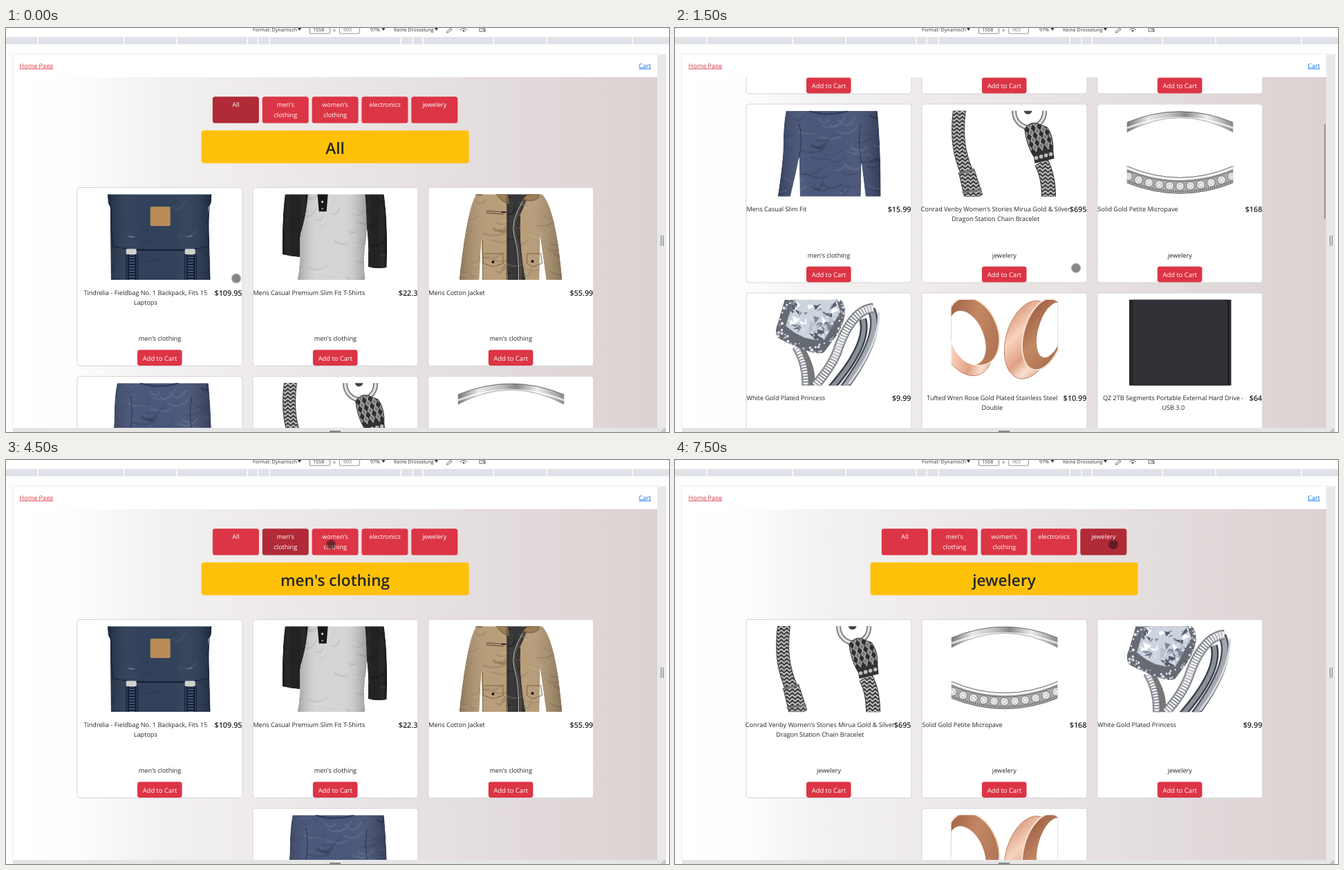
An HTML page that plays this animation: 959 by 584 pixels, repeating every 8 s.

```html
<!DOCTYPE html>
<html lang="en">
<head>
<meta charset="utf-8">
<title>Shop</title>
<style>
html,body{margin:0;width:100%;height:100%;overflow:hidden;background:#fff}
svg{display:block}
#stage{width:959px;height:584px}
text{font:9.1px "Open Sans","Noto Sans",sans-serif;fill:#212529;text-rendering:geometricPrecision}
.mid{text-anchor:middle}
.price{font-size:10.8px;font-weight:600;text-anchor:end}
.head{font-size:22.6px;font-weight:600;text-anchor:middle}
.light{fill:#fff;text-anchor:middle}
.bar{font-size:7.1px;fill:#333}
.link{text-decoration:underline}
.card{fill:#fff;stroke:#d6d3d3}
.red{fill:#dc3545}
.on{fill:#b02a37}
.line{fill:none}
</style>
</head>
<body>
<svg id="stage" viewBox="0 0 959 584">
<defs>
  <linearGradient id="bg">
    <stop offset="0" stop-color="#fff"/><stop offset=".1" stop-color="#fdfdfd"/>
    <stop offset=".22" stop-color="#f3f1f1"/><stop offset=".5" stop-color="#ebe6e6"/>
    <stop offset=".85" stop-color="#e0d8d8"/><stop offset="1" stop-color="#dcd2d2"/>
  </linearGradient>
  <linearGradient id="round">
    <stop offset="0" stop-opacity=".3"/><stop offset=".3" stop-color="#fff" stop-opacity=".06"/>
    <stop offset=".65" stop-color="#fff" stop-opacity=".06"/><stop offset="1" stop-opacity=".32"/>
  </linearGradient>
  <linearGradient id="metal">
    <stop offset="0" stop-color="#777"/><stop offset=".2" stop-color="#e9e9e9"/><stop offset=".42" stop-color="#bbb"/>
    <stop offset=".55" stop-color="#888"/><stop offset=".75" stop-color="#eee"/><stop offset="1" stop-color="#888"/>
  </linearGradient>
  <linearGradient id="rose" x2="1" y2="1">
    <stop offset="0" stop-color="#c98263"/><stop offset=".35" stop-color="#f8d3bd"/>
    <stop offset=".6" stop-color="#e0a185"/><stop offset=".75" stop-color="#fbe0d0"/><stop offset="1" stop-color="#c98566"/>
  </linearGradient>
  <linearGradient id="roseIn" x2="1" y2="1">
    <stop offset="0" stop-color="#95573c"/><stop offset=".5" stop-color="#c28763"/><stop offset="1" stop-color="#a86c4e"/>
  </linearGradient>
  <pattern id="weave" width="8" height="5.5" patternUnits="userSpaceOnUse">
    <path d="M0 0h8v6H0z" fill="#333"/>
    <path d="M0 0L4 4L8 0M0 5.5L4 9.5L8 5.5M0 -5.5L4 -1.5L8 -5.5" fill="none" stroke="#cfcfcf" stroke-width="1.9"/>
  </pattern>
  <pattern id="scale" width="9" height="11" patternUnits="userSpaceOnUse" patternTransform="rotate(-15)">
    <path d="M0 0h9v11H0z" fill="#2e2e2e"/>
    <path d="M4.5 0L8 5.5L4.5 11L1 5.5z" fill="#777" stroke="#ddd"/>
  </pattern>
  <pattern id="cloth" width="2" height="2" patternUnits="userSpaceOnUse">
    <path d="M0 0h1v1H0z" fill="#fff" fill-opacity=".07"/><path d="M1 1h1v1H1z" fill-opacity=".12"/>
  </pattern>
  <pattern id="pin" width="3.2" height="4" patternUnits="userSpaceOnUse">
    <path d="M0 0h4v4H0z" fill="#dadbe4"/><path d="M0 0h.9v4H0z" fill="#8186a3"/>
  </pattern>
  <clipPath id="view"><path d="M10 71h932v507H10z"/></clipPath>
</defs>
<g id="chrome"></g>
<g clip-path="url(#view)">
  <path d="M10 71h932v507H10z" fill="url(#bg)"/>
  <g id="page"></g>
</g>
<path id="thumb" d="M940 40v137" stroke="#979595" stroke-width="2"/>
<g id="touch">
  <circle r="7.2" fill="#000" fill-opacity=".3"/>
  <circle r="6" fill="#222" fill-opacity=".3"/>
</g>
<path id="arrow" d="M0 0v11l2.6-2.3l1.8 4l2-.9l-1.8-3.8h3.5z" fill="#fff" stroke="#222" stroke-width=".8"/>
</svg>
<script>
const $ = id => document.getElementById(id);
const range = (n, f) => Array.from({length: n}, (_, i) => f(i)).join('');
const fill = (d, color, extra = '') => `<path d="${d}" fill="${color}" ${extra}/>`;
const line = (d, color, w = 1, extra = '') => `<path class="line" d="${d}" stroke="${color}" stroke-width="${w}" ${extra}/>`;
const rect = (x, y, w, h, color, r = 0, extra = '') =>
  `<rect x="${x}" y="${y}" width="${w}" height="${h}" rx="${r}" fill="${color}" ${extra}/>`;
const dot = (x, y, r, color, extra = '') => `<circle cx="${x}" cy="${y}" r="${r}" fill="${color}" ${extra}/>`;
const oval = (x, y, rx, ry, turn, color, extra = '') =>
  `<ellipse rx="${rx}" ry="${ry}" transform="translate(${x} ${y}) rotate(${turn})" fill="${color}" ${extra}/>`;
const text = (x, y, str, cls = '', extra = '') => `<text x="${x}" y="${y}" class="${cls}" ${extra}>${str}</text>`;

let seed = 7, clips = 0;
const rnd = () => (seed = seed * 16807 % 2147483647) / 2147483647;
const clipped = (d, body) => {
  const id = 'clip' + clips++;
  return `<clipPath id="${id}"><path d="${d}"/></clipPath><g clip-path="url(#${id})">${body}</g>`;
};

// A garment silhouette with soft random creases kept inside it.
const fabric = (d, color, n = 40, depth = .16) => clipped(d, fill(d, color) + fill(d, 'url(#round)', 'opacity=".8"') +
  range(n, i => {
    const x = rnd() * 150, y = rnd() * 124, l = 10 + rnd() * 22;
    return line(`M${x} ${y}q${l / 2} ${4 + rnd() * 8} ${l} ${rnd() * 14 - 10}`, i % 3 ? '#000' : '#fff', 1 + rnd() * 2.5,
      `stroke-opacity="${i % 3 ? depth : depth * .6}"`);
  }) + fill(d, 'url(#cloth)'));

const stone = (x, y, r) => dot(x, y, r, '#ececee', 'stroke="#666" stroke-width=".8"') +
  line(`M${x - r * .6} ${y}l${r * .6} ${-r * .6}l${r * .6} ${r * .6}l${-r * .6} ${r * .6}z`, '#888', .6);
const band = (d, w) => line(d, '#62666f', w) + line(d, '#b9bcc2', w - 2) +
  line(d, '#70747c', w - 3, 'stroke-dasharray="2 2"') + line(d, '#f4f4f5', w - 5, 'stroke-dasharray="2.6 1.6"');
const tee = (color, edge) => {
  const d = 'M30 0H48Q76 8 104 0H128Q140 10 150 43L122 51L120 124H34L32 51L2 43Q14 10 30 0z';
  return fabric(d, color, 26, .06) + line('M46 0Q76 17 106 0M34 28V56M120 28V56', edge) + line(d, edge, .7);
};
const slab = (x, y, w, h) => rect(x, y, w, h, '#292b2f', 2) + rect(x + 6, y, w - 12, h, '#303237');
const screen = (y, h, color) => rect(0, y, 154, h, '#1b1c1f', 2) + rect(4, y + 4, 146, h - 9, color) +
  fill(`M4 ${y + h - 5}Q60 ${y + 10} 150 ${y + 22}V${y + h - 5}z`, '#fff', 'fill-opacity=".18"') +
  rect(66, y + h, 22, 20, '#333');

const art = {
  pack: () => fabric('M1 0H152L151 13L147 19L150 124H6L5 19L2 13z', '#263753', 18, .08) +
    line('M5 0Q8 60 9 76L36 80H120L147 76Q146 40 150 0', '#14203a') + line('M36 81H118', '#111b30', 1.6) +
    line('M31 61l9 1M117 62l7-2', '#7b8798', 1.2) +
    [30, 115].map(x => rect(x, 87, 13, 37, '#16213a') + line(`M${x + 6.5} 87V124`, '#71809a', 8, 'stroke-dasharray="1 3"') +
      line(`M${x - 2} 87V124M${x + 15} 87V124`, '#121c30') + rect(x - 2, 79, 15, 8, '#d3d1cc', 2)).join('') +
    rect(63, 18, 29, 28, '#b98c59', 2),
  henley: () => fabric('M4 0H39Q36 35 26 62L26 91Q12 90 0 87Q0 30 4 0z', '#151516', 30, .2) +
    fabric('M118 0H147Q153 40 151 106Q137 109 124 105Q126 60 119 30z', '#151516', 30, .2) +
    fabric('M37 0H120Q123 35 122 60Q116 92 120 124H22Q27 98 26 58Q35 30 37 0z', '#d9d9da', 45, .07) +
    fill('M51 0H66L64 25H53z', '#18181a') + dot(58, 11, 1.6, '#ccc') + dot(58, 21, 1.2, '#999'),
  jacket: () => fabric('M27 0Q13 20 2 124H31L34 66L36 124H118L119 60L128 124H151Q142 20 122 0z', '#b99c75', 45, .1) +
    fabric('M70 0H104L91 28Q88 70 98 124H72z', '#2b2b2d', 25, .25) +
    fill('M56 0H72L74 14Q60 9 56 0zM101 0H118Q117 13 94 8z', '#9b7d57', 'stroke="#6d5539"') +
    line('M97 7Q77 40 84 62Q92 85 91 124M71 3V124', '#65513a', 1.4) + line('M94 10Q75 40 82 62Q89 85 88 124', '#ddd', .8) +
    line('M41 24L66 26M41 27L66 29', '#574530') + line('M63 26h7', '#222', 2) + rect(26, 0, 10, 2, '#846a49') +
    line('M36 86H65L66 100L51 105L37 100zM100 86H120L122 100L108 105L100 100zM36 67V124', '#806645') +
    dot(51, 98, 2, '#191919') + dot(108, 97, 2, '#191919'),
  sweater: () => fabric('M15 0H147Q152 50 152 124H130L124 74L123 124H35L34 66Q29 92 21 124H3Q11 70 11 50Q11 20 15 0z', '#414f76', 60, .13) +
    line('M48 0Q76 9 104 0', '#2c385a', 2) + line('M34 68Q39 40 34 18M124 76Q118 40 123 20', '#27334f'),
  bracelet: () => line('M12 -2C7 36 11 62 23 90', '#444', 19) + line('M12 -2C7 36 11 62 23 90', 'url(#weave)', 17) +
    fill('M11 90L33 84L45 121L40 124H19z', 'url(#weave)', 'stroke="#444"') + line('M10 91L34 85M16 118L44 114', '#777', 3) +
    oval(113, 1, 22, 23, 0, 'none', 'stroke="#777" stroke-width="7"') +
    oval(113, 1, 22, 23, 0, 'none', 'stroke="#e2e2e2" stroke-width="3.5"') +
    dot(111, -1, 6, '#444') + line('M130 74Q141 94 141 126', '#333', 21) + line('M130 74Q141 94 141 126', 'url(#weave)', 19) +
    fill('M106 26Q114 15 124 18L139 24Q149 38 147 61L119 66Q109 50 106 26z', 'url(#scale)', 'stroke="#333"') +
    fill('M118 60L147 54L149 69L121 76z', '#333') + range(4, i => dot(123 + i * 7, 68 - i * 1.8, 2.8, '#bbb')),
  ring: () => fill('M0 17Q77 -15 154 17V31Q77 -11 0 31z', 'url(#metal)') + line('M0 17Q77 -15 154 17', '#666') +
    line('M0 25Q77 -5 154 25', '#fff', 3, 'stroke-opacity=".7"') + line('M0 31Q77 -11 154 31', '#999', .8) +
    fill('M0 80Q77 114 154 80V104Q77 135 0 104z', '#a9a9ab') + line('M0 82Q77 115 154 82', '#f4f4f4', 3.5) +
    line('M0 80Q77 113 154 80M0 86Q77 118 154 86M0 104Q77 135 154 104', '#666', 1) +
    line('M0 101Q77 132 154 101', '#444', 2, 'stroke-dasharray="1 2"') +
    range(11, i => { const x = 2 + i * 15, u = x / 77 - 1; return stone(x, 109 - 15 * u * u, 5.8); }),
  gem: () => {
    const halo = 'M13 0H94Q108 14 91 48L70 76Q60 84 4 56Q-3 46 3 34z', table = 'M14 38L25 1Q55 -8 88 0L94 17L71 58Q42 63 14 38z';
    return line('M32 68Q55 104 47 126', '#777', 15) + band('M29 68Q45 95 43 126', 11) +
      line('M138 14Q156 50 98 128', '#4b505a', 12) + line('M138 14Q156 50 98 128', '#a3a8b0', 7) +
      line('M126 28Q136 64 80 128', '#3c414b', 11) + line('M126 28Q136 64 80 128', '#8b9099', 6) +
      line('M149 18Q150 64 106 122', '#d9dbde', 3) + band('M141 12Q112 14 92 66Q84 94 57 124', 14) +
      clipped(halo, fill(halo, '#666a73') + range(150, () => {
        const a = rnd() * 6.28, r = .95 + rnd() * .4;
        return dot(50 + Math.cos(a) * 43 * r, 32 + Math.sin(a) * 36 * r, 1.2 + rnd() * 1.5, '#e3e5e9', 'stroke="#555a64" stroke-width=".7"');
      })) +
      clipped(table, fill(table, '#cdd4de') + range(90, i => {
        const x = 12 + rnd() * 78, y = rnd() * 58;
        return fill(`M${x} ${y}l${rnd() * 15} ${rnd() * 7}l${-rnd() * 12} ${rnd() * 9}z`, ['#fff', '#7f8a9b', '#b8c1cc', '#525d6e'][i % 4]);
      })) + line(table, '#6b7078');
  },
  bands: () => {
    const hoop = (x, turn, out, y) => oval(x + out, y + 15, 35, 51, turn, 'url(#rose)', 'stroke="#b97858" stroke-width=".8"') +
      oval(x, y, 35, 51, turn, 'url(#roseIn)', 'stroke="#f9dfcf" stroke-width="2"') +
      oval(x + out * .9, y + 9, 24, 41, turn, '#fff');
    const right = oval(113, 58, 34, 58, 16, 'url(#rose)', 'stroke="#b97858" stroke-width=".8"') +
      oval(133, 50, 28, 53, 16, 'url(#roseIn)', 'stroke="#f9dfcf" stroke-width="2"') + oval(144, 44, 18, 41, 16, '#fff');
    return hoop(32, -22, -10, 46) + right;
  },
  drive: () => slab(3.4, -3, 147.6, 130) + line('M7 0V124M147 0V124', '#17181a', 1),
  ssd: () => slab(8, 8, 138, 108) + rect(18, 35, 118, 34, '#b6343b') + text(77, 58, 'SSD 1TB', 'light'),
  chip: () => slab(12, 6, 130, 112) + rect(22, 16, 110, 92, '#39424d') + text(77, 66, '256GB', 'light'),
  box: () => slab(30, 4, 94, 118) + rect(34, 8, 86, 22, '#3468a5'),
  monitor: () => screen(6, 88, '#327cac'),
  wide: () => screen(22, 66, '#6b3e8b'),
  coat: () => fabric('M27 0H126Q139 40 152 85L142 124H18L1 85Q12 40 27 0z', '#35175a', 45, .16) +
    fill('M37 63L29 85L46 116L43 124H50zM117 63L125 85L108 116L111 124H104z', '#fff', 'opacity=".9"') +
    fill('M46 0H104Q98 18 78 26Q56 17 46 0z', '#1c0d32') + fill('M60 0H94L78 20z', '#4d2b74') +
    line('M77 21V124M62 22Q60 75 46 124M94 22Q92 75 108 124M33 68H118', '#1b0a33', 1.4) +
    line('M66 22V48M90 27V53', '#111', 2) + line('M76 20v15', '#bbb') + rect(96, 25, 4, 4, '#ddd'),
  leather: () => fabric('M22 0H126Q137 45 148 124H126L121 72L118 124H36L33 72L26 124H8Q11 45 22 0z', '#313234', 55, .2) +
    fill('M40 0H108L78 25z', '#111213') + line('M78 22V124', '#999', 1.4) + line('M36 27H63M93 27H122M45 36V62H64M91 60H112V35', '#111') +
    line('M36 25H58M97 24H120', '#777') + line('M58 12Q62 28 56 58M98 12Q96 28 101 46', '#999', 1) +
    line('M44 84l-5 18M106 84l7 18', '#aaa', 1.5),
  rain: () => fabric('M15 0H138Q146 45 151 122H127L122 70V124H29L30 70L23 122H0Q5 45 15 0z', '#243a60', 40, .15) +
    fabric('M59 0H101Q91 60 98 124H65Q70 50 59 0z', 'url(#pin)', 14, .1) +
    line('M51 0Q67 60 64 124M112 0Q94 60 99 124', '#101e3a', 2) + line('M28 72H60M100 72H125M32 20V116M122 20V116', '#14233f') +
    fill('M1 107L25 111L23 123L0 121zM127 111L150 107L151 121L129 123z', 'url(#pin)', 'stroke="#9397aa" stroke-width=".6"') +
    line('M28 67q10-10 9 2q-9 6-6 22M36 69l2 27', '#0c111c', 2) + range(5, i => dot(62 + i % 2, 12 + i * 25, 1.3, '#c4c8d0')),
  white: () => tee('#f8f8f8', '#d9d9d9'),
  scarlet: () => tee('#cf263e', '#a31c32') + line('M56 0L76 19L97 0', '#931629', 1.6),
  plum: () => tee('#55294f', '#351535') + text(84, 43, 'be', 'light', 'style="font:italic 19px Lato,sans-serif"') +
    text(75, 64, 'kind', 'light', 'style="font:italic 22px Lato,sans-serif"') +
    line('M65 43C57 36 60 32 65 36C70 31 74 36 65 43', '#fff') + fill('M123 56L148 52L154 75H124z', '#263b5b')
};

const men = "men's clothing", women = "women's clothing", tech = 'electronics', gold = 'jewelery';
// art, category, price, title ("|" breaks the line)
const goods = [
  ['pack', men, '$109.95', 'Tindrelia - Fieldbag No. 1 Backpack, Fits 15|Laptops'],
  ['henley', men, '$22.3', 'Mens Casual Premium Slim Fit T-Shirts'],
  ['jacket', men, '$55.99', 'Mens Cotton Jacket'],
  ['sweater', men, '$15.99', 'Mens Casual Slim Fit'],
  ['bracelet', gold, '$695', "Conrad Venby Women's Stories Mirua Gold &amp; Silver|Dragon Station Chain Bracelet"],
  ['ring', gold, '$168', 'Solid Gold Petite Micropave'],
  ['gem', gold, '$9.99', 'White Gold Plated Princess'],
  ['bands', gold, '$10.99', 'Tufted Wren Rose Gold Plated Stainless Steel|Double'],
  ['drive', tech, '$64', 'QZ 2TB Segments Portable External Hard Drive -|USB 3.0'],
  ['ssd', tech, '$109', 'Zelbrix SSD PLUS 1TB Internal SSD - SATA III|6 Gb/s'],
  ['chip', tech, '$109', 'Voltarne Core 256GB SSD 3D NAND Cache|Boost SATA III 2.5'],
  ['box', tech, '$114', 'QZ 4TB Gaming Drive Portable External'],
  ['monitor', tech, '$599', 'Olvex 21.5 inches Full HD Monitor'],
  ['wide', tech, '$999.99', 'Tarvion 49-Inch Curved Gaming Monitor'],
  ['coat', women, '$56.99', "QUORVELTANE Women's 3-in-1 Snowboard|Jacket Winter Coats"],
  ['leather', women, '$29.95', "Fern and Wick Women's Removable Hooded|Faux Leather Moto Biker Jacket"],
  ['rain', women, '$39.99', 'Rain Jacket Women Windbreaker Striped|Climbing Raincoats'],
  ['white', women, '$9.85', "Women's Solid Short Sleeve Boat Neck"],
  ['scarlet', women, '$7.95', "Women's Short Sleeve Moisture"],
  ['plum', women, '$12.99', 'Womens T Shirt Casual Cotton Short']
];
const tabs = ['All', men, women, tech, gold];

function card([pic, kind, price, title], x, y) {
  const lines = title.split('|'), priceW = price.length * 6.35 - (price.includes('.') ? 3 : 0);
  const label = lines.length > 1
    ? lines.map((s, i) => text(x + (239 - priceW) / 2, y + 155 + i * 14.2, s, 'mid')).join('')
    : text(x + .5, y + 155, title);
  seed = 7; // the same item always gets the same creases
  return rect(x, y, 239, 258, '#fff', 3.6, 'class="card"') +
    `<svg x="${x + 42.7}" y="${y + 9.7}" width="154" height="124">${art[pic]()}</svg>` + label +
    text(x + 238.5, y + 156, price, 'price') + text(x + 119.5, y + 221.5, kind, 'mid') +
    rect(x + 87, y + 234.8, 64.6, 22.7, '#dc3545', 3.4) + text(x + 119.5, y + 250, 'Add to Cart', 'light', 'style="font-size:9.4px"');
}

function shelf(tab) {
  const list = tab ? goods.filter(g => g[1] === tabs[tab]) : goods.slice(0, 9);
  const cards = list.map((g, i) => {
    const alone = i === list.length - 1 && i % 3 === 0;
    return card(g, 103 + 253.9 * (alone ? 1 : i % 3), 230.5 + 273 * Math.floor(i / 3));
  }).join('');
  return `<g class="shelf">${rect(282.6, 148, 387, 47.6, '#ffc107', 3.6)}${text(476, 181.5, tabs[tab], 'head')}${cards}</g>`;
}

const tabButton = (name, i) => {
  const x = 298.9 + i * 71.85;
  return `<rect class="tab red" x="${x}" y="99.3" width="67" height="38.2" rx="3.6"/>` +
    name.split(' ').map((s, k) => text(x + 33.5, 114.3 + k * 14.2, s, 'light')).join('');
};

const caret = x => fill(`M${x} 0h5l-2.5 4z`, '#333');
$('chrome').innerHTML =
  rect(0, 13, 959, 10.5, '#dfe3e8') +
  [46, 170, 247, 349, 364, 381, 571, 588, 603, 705, 782, 906].map(x => rect(x - .5, 13, 1.5, 10.5, '#fff')).join('') +
  rect(0, 24, 959, 560, '#fdfdfd') + rect(9.5, 37.5, 933, 541, '#fff', 0, 'stroke="#ececec"') +
  rect(943, 38, 12, 540, '#e9e7e7') + rect(10, 578, 945, 6, '#e6e5e5') +
  line('M947.5 300v15M950.5 300v15', '#777') + rect(468, 582, 16, 2, '#888') + line('M948 584l5-5M951 584l3-3', '#888') +
  text(357, 4.8, 'Format: Dynamisch', 'bar') + caret(422) + text(527, 4.8, '97%', 'bar') + caret(543.5) +
  text(561, 4.8, 'Keine Drosselung', 'bar') + caret(620) + text(473, 5.5, '×', 'bar') +
  rect(439.5, -5, 29, 13, '#fff', 1, 'stroke="#888"') + rect(482.5, -5, 29, 13, '#fff', 1, 'stroke="#999"') +
  text(444, 5, '1558', 'bar') + text(488, 5, '903', 'bar', 'style="fill:#777"') +
  line('M637 6l6-6l2 2l-6 5z', '#666') + line('M657 3q5-5 10 0', '#666') + dot(662, 4, 1.6, '#666') +
  line('M685 0h7v5h-7zM688 2h5v4', '#666') +
  text(19.5, 57.6, 'Home Page', 'link red') + text(933, 57.6, 'Cart', 'link', 'style="fill:#0d6efd;text-anchor:end"');
$('page').innerHTML = tabs.map(tabButton).join('') + tabs.map((_, i) => shelf(i)).join('');

// One pose per half second: scroll, pointer x and y, shelf, pressed tab.
const poses = [
  [0, 333, 362, 0, 0], [97, 322, 354, 0, 0], [262, 450, 350, 0, 0], [393.5, 580, 347, 0, 0],
  [330, 597, 348, 0, 0], [215, 611, 348, 0, 0], [0, 545, 260, 0, 0], [0, 416, 108, 0, 0],
  [0, 413, 118, 1, 1], [0, 470, 122, 1, 1], [0, 478, 124, 2, 2], [0, 534.5, 127, 2, 2],
  [0, 542, 125, 3, 3], [0, 590, 124, 3, 3], [0, 632, 122, 3, 4], [0, 634, 122, 4, 4]
];
const shelves = document.querySelectorAll('.shelf'), buttons = document.querySelectorAll('.tab');
const show = (el, on) => el.setAttribute('display', on ? 'inline' : 'none');
const move = (el, x, y) => el.setAttribute('transform', `translate(${x} ${y})`);
const start = performance.now();
let last = -1;

function draw() {
  const step = Math.floor((performance.now() - start) % 8000 / 500);
  if (step !== last) {
    const [scroll, x, y, shelfNo, pressed] = poses[last = step];
    move($('page'), 0, -scroll);
    move($('thumb'), 0, scroll * .252);
    show($('thumb'), step > 0 && step < 8);
    move($('touch'), x, y);
    move($('arrow'), x, y);
    show($('touch'), step !== 7);
    show($('arrow'), step === 7);
    shelves.forEach((s, i) => show(s, i === shelfNo));
    buttons.forEach((b, i) => b.setAttribute('class', i === pressed ? 'tab on' : 'tab red'));
  }
  requestAnimationFrame(draw);
}
draw();
</script>
</body>
</html>
```
